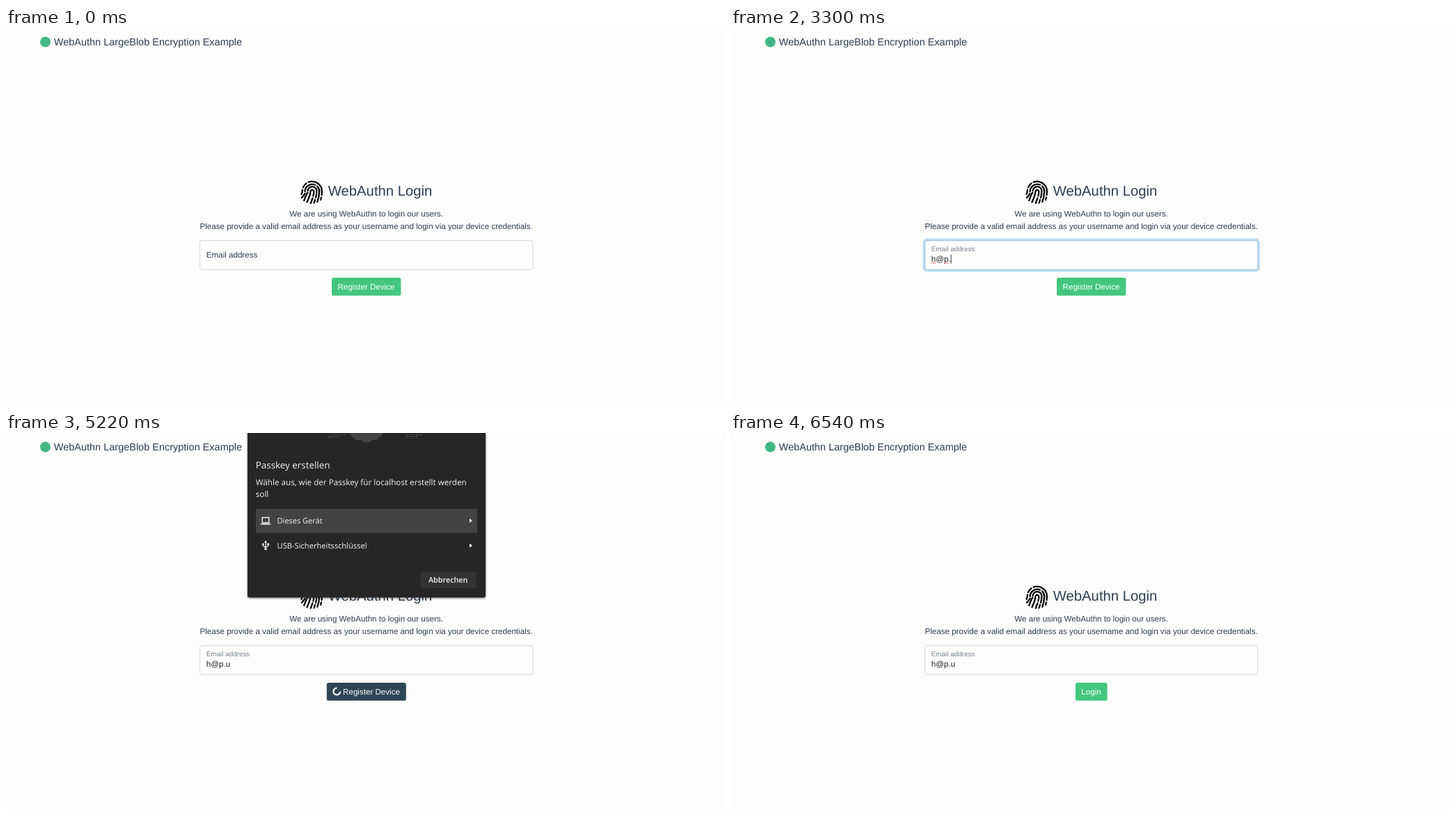
Write an HTML page that moves like this. It is 1033 px wide and 542 px high and loops after 8000 ms.

```html
<!DOCTYPE html>
<html lang="en">
<head>
<meta charset="utf-8">
<title>WebAuthn Login</title>
<style>
  html, body { margin: 0; width: 100%; height: 100%; overflow: hidden; background: #fdfdfc; }
  svg { display: block; width: 100vw; height: 100vh; }
  text { font: 11.6px "Liberation Sans", Arial, sans-serif; fill: #2c3e50; text-rendering: geometricPrecision; white-space: pre; }
  .mid { text-anchor: middle; }
  .popup text { font-family: "Open Sans", "Noto Sans", sans-serif; fill: #f4f4f4; }
  .line { fill: none; stroke-linecap: round; stroke-linejoin: round; }
</style>
</head>
<body>
<svg viewBox="0 0 1033 542">
  <defs>
    <filter id="shadow" x="-10%" y="-10%" width="120%" height="120%">
      <feDropShadow dx="0" dy="1" stdDeviation="1.8" flood-opacity=".55"/>
    </filter>
  </defs>
  <rect width="1033" height="542" fill="#fdfdfc"/>

  <circle cx="56.5" cy="20" r="7.5" fill="#41b883"/>
  <text x="68.8" y="24.6" style="font-size:14.49px">WebAuthn LargeBlob Encryption Example</text>

  <g class="line" transform="translate(440 235)" stroke="#000" stroke-width="2.3">
    <path d="M-13-6A14.5 14.5 0 0 1-8.5-11.6M-5.4-13.5A14.5 14.5 0 0 1 13.5-4Q14.3 0 13.6 5M13 8.5L12 12"/>
    <path d="M-15.5 4Q-14.3 1-14-2.5M-10.4 0A10.4 10.4 0 0 1 4-9.5M7-7.6A10.4 10.4 0 0 1 10.2 0Q10 8 7.2 15"/>
    <path d="M-15 9Q-11.5 5-10.6 3M-6.4-1A6.4 6.4 0 0 1 6.4 0Q6.2 5 5 9M4 12L2.6 16.5"/>
    <path d="M-11.8 13Q-7-.2-6.6 2M-7.6 15.5Q-2.6 5-2.5-.4A2.5 2.5 0 0 1 2.3-.2Q2.3 3 1.4 6.5M.5 9.5L-2.2 16.8"/>
  </g>
  <text x="462.8" y="241.2" style="font-size:20.28px">WebAuthn Login</text>
  <text class="mid" x="517.6" y="271">We are using WebAuthn to login our users.</text>
  <text class="mid" x="517.6" y="288.6">Please provide a valid email address as your username and login via your device credentials.</text>

  <rect id="ring" x="277" y="304" width="481.5" height="45" rx="4.4" fill="none" stroke="#c3dcf2" stroke-width="3"/>
  <rect id="field" x="278.6" y="305.7" width="478.2" height="41.6" rx="2.9" fill="#fdfdfc" stroke-width=".9"/>
  <text id="label">Email address</text>
  <text id="value" x="287.8" y="335.8" style="fill:#212529"></text>
  <path id="squiggle" class="line" stroke="#e04a4a" stroke-width=".9"/>
  <rect id="caret" y="325.6" width=".9" height="13" fill="#212529"/>

  <rect id="button" y="359" height="25.8" rx="2.9"/>
  <path id="spinner" class="line" stroke="#fff" stroke-width="2.2" style="stroke-linecap:butt" d="M3.46 3.46A4.9 4.9 0 1 1 3.46-3.46"/>
  <text id="caption" y="375.9" style="fill:#fff"></text>

  <g id="suggestions" class="popup">
    <path d="M371 373H377L384 366.3L391 373H512A3 3 0 0 1 515 376V465A3 3 0 0 1 512 468H371A3 3 0 0 1 368 465V376A3 3 0 0 1 371 373Z" fill="#1a1b1a" filter="url(#shadow)"/>
    <text x="377.5" y="393.8" style="font-size:11.5px">post@quorvi.example</text>
    <text x="377.5" y="421.2" style="font-size:11.5px">torvan@q.example</text>
    <circle cx="383.6" cy="451.4" r="5.6" fill="#f4f4f4"/>
    <text x="398.8" y="455.6" style="font-size:12.2px;fill:#858585">Verwalten…</text>
  </g>

  <g id="dialog" class="popup">
    <rect x="347" y="-60" width="342" height="296.5" rx="3" fill="#282828" filter="url(#shadow)"/>
    <path d="M494 0H541Q541 5 535 7L532 10H526Q524 13 518 13.5Q512 13 510 10H503L500 7Q495 5 494 0Z" fill="#444"/>
    <path d="M463 5.5H479M471 2.5H487M575 2.5H598M575 5.5H591" stroke="#666" stroke-width="1" stroke-dasharray="2 1.5"/>
    <text x="358.8" y="51" style="font-size:13.4px">Passkey erstellen</text>
    <text x="358.8" y="74.7" style="font-size:11.67px">Wähle aus, wie der Passkey für localhost erstellt werden</text>
    <text x="358.8" y="91.5" style="font-size:11.67px">soll</text>
    <rect x="359" y="109" width="318" height="34.5" fill="#434343"/>
    <path d="M368.2 121.5H377.8V129H368.2ZM365.6 131H380.4" class="line" stroke="#f4f4f4" stroke-width="1.4" style="stroke-linecap:butt"/>
    <text x="389.6" y="130" style="font-size:11px">Dieses Gerät</text>
    <path d="M666 123L670 126L666 129ZM666 158.7L670 161.7L666 164.7Z" fill="#f4f4f4"/>
    <path d="M373 166.5V157M369.3 160V162.2L373 164.4L376.7 162.2V160" class="line" stroke="#f4f4f4" stroke-width="1.2"/>
    <path d="M371 157.6L373 154.6L375 157.6ZM375.4 158.6H378V161.2H375.4Z" fill="#f4f4f4"/>
    <circle cx="369.3" cy="160" r="1.4" fill="#f4f4f4"/>
    <circle cx="373" cy="166.8" r="1.7" fill="#f4f4f4"/>
    <text x="389.6" y="165.6" style="font-size:11.15px">USB-Sicherheitsschlüssel</text>
    <rect x="595" y="199" width="81" height="24.5" rx="2.5" fill="#333" stroke="#212121" stroke-width=".8"/>
    <text class="mid" x="635.2" y="215.3" style="font-size:10.8px;font-weight:600">Abbrechen</text>
  </g>
</svg>
<script>
const LOOP = 8000;
const FOCUS = 720, SUBMIT = 4580, SPIN_END = 6200, DONE = 6540;
const EMAIL = "h@p.u";
const KEYS = [1650, 2250, 2850, 3300, 3500];
const GREEN = [67, 199, 127], DARK = [46, 70, 84];
const GREY = [206, 212, 218], BLUE = [138, 182, 224];
const TEXT_X = 287.8, EM = 11.6;

const el = Object.fromEntries([...document.querySelectorAll("[id]")].map(e => [e.id, e]));
const set = (e, attrs) => { for (const k in attrs) e.setAttribute(k, attrs[k]); };
const show = (e, on) => set(e, { visibility: on ? "visible" : "hidden" });
const ramp = (t, from, to) => Math.min(1, Math.max(0, (t - from) / (to - from)));
const smooth = u => u * u * (3 - 2 * u);
const mix = (a, b, u) => a + (b - a) * u;
const blend = (a, b, u) => `rgb(${a.map((v, i) => Math.round(mix(v, b[i], u)))})`;

function wave(from, to) {
  let d = `M${from} 338.6`;
  for (let x = from + 1.5, up = true; x <= to; x += 1.5, up = !up) d += `L${x} ${up ? 337.2 : 338.6}`;
  return d;
}

function drawField(t) {
  const focus = smooth(ramp(t, FOCUS, 870)) * (1 - smooth(ramp(t, SUBMIT, 4730)));
  set(el.ring, { opacity: focus });
  set(el.field, { stroke: blend(GREY, BLUE, focus) });

  const lift = smooth(ramp(t, FOCUS, 830));
  set(el.label, {
    transform: `translate(${TEXT_X} ${mix(329.9, 321.4, lift)}) scale(${mix(1, .85, lift)})`,
    opacity: mix(1, .65, lift)
  });

  const typed = KEYS.filter(k => k <= t);
  el.value.textContent = EMAIL.slice(0, typed.length);
  const end = TEXT_X + (typed.length ? el.value.getComputedTextLength() : 0);

  const editing = t >= FOCUS && t < SUBMIT;
  const lastInput = typed.length ? typed[typed.length - 1] : FOCUS;
  show(el.caret, editing && (t - lastInput) % 1000 < 500);
  set(el.caret, { x: end });

  // Spell check marks a word once a separator follows it.
  const letter = .556 * EM, second = TEXT_X + letter + 1.015 * EM;
  let marks = "";
  if (t >= 2320) marks += wave(TEXT_X, TEXT_X + letter);
  if (typed.length > 3) marks += wave(second, typed.length > 4 ? end : second + letter);
  set(el.squiggle, { d: marks });
  show(el.squiggle, editing);
}

function drawButton(t) {
  const busy = t >= SUBMIT && t < DONE, done = t >= DONE;
  const [x, width, textX] = done ? [494.9, 45.7, 503.3] : busy ? [460.8, 114, 484.1] : [468, 99.4, 476.6];
  const fill = done ? blend(GREEN, GREEN, 0) : blend(GREEN, DARK, ramp(t, SUBMIT, 4700));
  set(el.button, { x, width, fill });
  set(el.caption, { x: textX });
  el.caption.textContent = done ? "Login" : "Register Device";
  show(el.spinner, busy);
  const angle = (Math.min(t, SPIN_END) - 4562) / 750 * 360;
  set(el.spinner, { transform: `translate(475.3 371.6) rotate(${angle})` });
}

function drawPopups(t) {
  const list = ramp(t, 760, 890) * (1 - ramp(t, 1650, 1860));
  set(el.suggestions, { opacity: list });
  show(el.suggestions, list > 0);

  const away = (1 - ramp(t, 4610, 4810)) ** 2 + ramp(t, 5630, 5850) ** 2;
  const scale = 1 + .1 * away;
  set(el.dialog, {
    opacity: 1 - away,
    transform: `translate(518 205) scale(${scale}) translate(-518 -205)`
  });
  show(el.dialog, away < 1);
}

function draw(t) {
  drawField(t);
  drawButton(t);
  drawPopups(t);
}

const start = performance.now();
function tick() {
  draw((performance.now() - start) % LOOP);
  requestAnimationFrame(tick);
}
tick();
</script>
</body>
</html>
```
